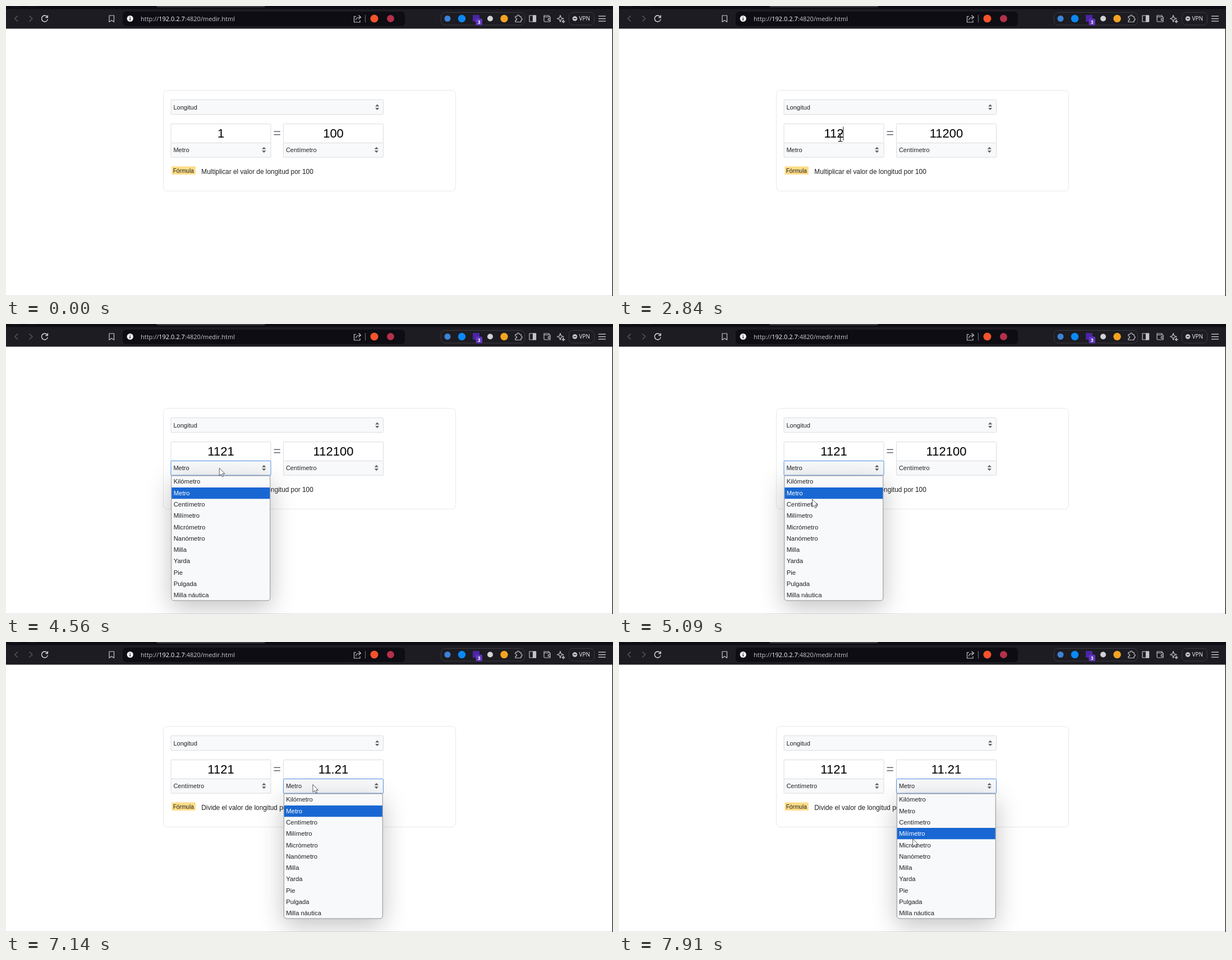
Write an HTML page that moves like this. It is 1082 px wide and 518 px high and loops after 8 s.

```html
<!DOCTYPE html>
<html lang="es">
<head>
<meta charset="utf-8">
<title>Conversor</title>
<style>
html, body { margin: 0; width: 100%; height: 100%; overflow: hidden; background: #fff; }
svg { display: block; width: 1082px; height: 518px; font: 11.05px "Liberation Sans", Arial, sans-serif; fill: #202124; }
.bar { font-family: "Open Sans", "Noto Sans", sans-serif; font-size: 11px; }
.icon { fill: none; stroke: #c4c4ca; stroke-width: 1.2; stroke-linejoin: round; }
.pill { fill: none; stroke: #3a3a42; }
.value { font-size: 22px; text-anchor: middle; fill: #000; }
.field { stroke: #dadce0; }
.focus { stroke: #4d90e8; }
.mark { fill: #5f6368; }
.list { font-size: 11.3px; }
.popup { fill: #f8f9fa; stroke: #8f9194; filter: drop-shadow(0 12px 22px rgba(0, 0, 0, .24)); }
</style>
</head>
<body>
<svg viewBox="0 0 1082 518">
  <rect width="1082" height="518" fill="#fff"/>
  <path d="M0 517.5H1081" stroke="#dfe1e5"/>
  <rect x="1080.7" y="40" width="1.3" height="478" fill="#17181c"/>

  <g class="bar">
    <rect width="1082" height="40.5" fill="#1d1c22"/>
    <rect width="1082" height="5.5" fill="#0d0e14"/>
    <path d="M268 0H462Q462 2.2 458 2.2H272Q268 2.2 268 0" fill="#3c3d45"/>
    <path d="M8 0H24V1H8ZM38 0H56V1H38Z" fill="#1d1c22"/>
    <rect x="208" y="10" width="503" height="26" rx="6" fill="#0d0d13"/>
    <g class="icon">
      <path d="M21 17.5L15.5 22.5L21 27.5M41.5 17.5L47 22.5L41.5 27.5" stroke="#5d5d65"/>
      <path d="M73.4 19.2A5.5 5.5 0 1 0 74.4 23.5M74.4 16.5V20.5H70.4" stroke="#e4e4e8" stroke-width="1.3"/>
      <path d="M184 17H192.5V28.5L188.25 25.5L184 28.5Z"/>
      <path d="M624 18.5H620.5V29H631V25.5M623.5 25.5Q624 20 631.5 20M628.5 16.5L632.5 20L628.5 23.5"/>
      <path d="M640.5 16V29.5" stroke="#66666e"/>
      <path d="M908 18.5H911Q911 16 913 16T915 18.5H918V21.5Q920 21.5 920 23.5T918 25.5V28.5H908V25.5Q910.5 25.5 910.5 23.5T908 21.5Z"/>
      <rect x="933" y="17" width="11.5" height="11"/>
      <path d="M939.5 17H944.5V28H939.5Z" fill="#c4c4ca"/>
      <path d="M959 18V26.5Q959 28 960.5 28H970V19.5H960Q958.5 19 959 17H968V19.5M970 22.5H966.5V25.5H970"/>
      <path d="M988 16.5L989.5 21L994 22.5L989.5 24L988 28.5L986.5 24L982.5 22.5L986.5 21ZM993.5 25L994.2 27L996 27.7L994.2 28.4L993.5 30L992.8 28.4L991 27.7L992.8 27Z"/>
      <path d="M1056 18.2H1069M1056 22.7H1069M1056 27.2H1069" stroke="#d6d6db"/>
    </g>
    <circle cx="221.2" cy="22.5" r="5.6" fill="#f4f4f6"/>
    <path d="M221.2 19.2V20.6M221.2 21.8V25.7" stroke="#111" stroke-width="1.4"/>
    <text x="240" y="26.7" fill="#c9c9ce">http://<tspan fill="#fff">192.0.2.7</tspan>:4820/medir.html</text>
    <circle cx="656.5" cy="22.5" r="7" fill="#f4532b"/>
    <circle cx="685.5" cy="22.5" r="6.5" fill="#b5304a"/>
    <rect class="pill" x="775.5" y="11.5" width="149" height="22.5" rx="7"/>
    <circle cx="787" cy="22.5" r="5.5" fill="#3d82d6"/>
    <circle cx="812.5" cy="22.5" r="6.7" fill="#0a89f5"/>
    <rect x="832" y="16" width="12" height="12" fill="#4a25a5"/>
    <rect x="837.5" y="22.5" width="11.5" height="12" rx="2.5" fill="#6135bd"/>
    <text x="843.3" y="31.5" font-size="8" font-weight="700" text-anchor="middle" fill="#fff">3</text>
    <circle cx="863" cy="22.5" r="5" fill="#d2d2d6"/>
    <circle cx="888" cy="22.5" r="6.7" fill="#f3a321"/>
    <rect class="pill" x="1003.5" y="11.5" width="45" height="22.5" rx="7"/>
    <circle cx="1014" cy="22.5" r="4.3" fill="#c8c8ce"/>
    <path d="M1011.7 22.5H1016.3" stroke="#1d1c22" stroke-width="1.4"/>
    <text x="1021.5" y="26.2" font-size="10" fill="#f1f1f3">VPN</text>
  </g>

  <rect x="280.5" y="150.5" width="521" height="180" rx="7" fill="#fff" stroke="#e6e8eb"/>
  <g id="form"></g>
  <path d="M477.5 224.2H488.8M477.5 229.8H488.8" stroke="#5f6368" stroke-width="1.5"/>
  <rect x="295.5" y="286.5" width="42.3" height="14.5" rx="1" fill="#fddc86"/>
  <text x="297.7" y="298.4" font-size="10.15">Fórmula</text>
  <text id="formula" x="348.3" y="300.2" font-size="11.85"></text>
  <g id="popups"></g>
  <circle id="click" r="10" fill="#ff0" fill-opacity=".47"/>
  <g id="pointer">
    <path id="arrow" d="M0 0V13.8L3.2 10.9L5.3 15.6L7.4 14.7L5.4 10.1H9.6Z" fill="#fff" stroke="#45474d" stroke-width=".9"/>
    <path id="beam" d="M-3.8-6.8H-1.2Q0-6.8 0-5.6V5.6Q0 6.8-1.2 6.8H-3.8M3.8-6.8H1.2Q0-6.8 0-5.6M0 5.6Q0 6.8 1.2 6.8H3.8" fill="none" stroke="#111" stroke-width="1.2"/>
  </g>
</svg>
<script>
const LOOP = 8000, LEFT = 294, RIGHT = 494.5, ROW = 20.27, LIST_TOP = 271.3, HOVER_LAG = 60;
const UNITS = ['Kilómetro', 'Metro', 'Centímetro', 'Milímetro', 'Micrómetro', 'Nanómetro',
  'Milla', 'Yarda', 'Pie', 'Pulgada', 'Milla náutica'];

// start, end, steps, then from, control and to points
const MOVES = [
  [160, 780, 10, 537, 347, 225, 320, 394.5, 235],
  [3700, 4030, 6, 394.5, 235, 390, 242, 384.7, 249.5],
  [4500, 5090, 9, 384.7, 249.5, 365, 285, 344.5, 313],
  [5160, 5300, 3, 344.5, 313, 343, 315, 341.5, 315.8],
  [6230, 6730, 8, 341.5, 315.8, 440, 235, 547, 254.5],
  [7390, 7910, 9, 547, 254.5, 535, 303, 523.7, 351.5]
];
const CLICKS = [[1010, 1080], [1150, 1230], [4300, 4430], [5710, 5910], [6930, 7140]];
const CARET = [[1010, 1150], [1550, 2490], [2710, 3700], [4230, 4300]];
const TYPED = [[1970, '11'], [2710, '112'], [3150, '1121']];
const RESULTS = [[2160, '1100'], [2840, '11200'], [3280, '112100'], [5910, '11.21']];

const $ = id => document.getElementById(id);
const within = (t, a, b) => t >= a && t < b;
const during = (spans, t) => spans.some(([a, b]) => within(t, a, b));
const show = (el, on) => el.setAttribute('visibility', on ? 'visible' : 'hidden');
const latest = (list, t, first) => list.reduce((v, [at, next]) => t >= at ? next : v, first);

const box = (x, y, w, h, fill, id = '') =>
  `<rect id="${id}" class="field" x="${x}" y="${y}" width="${w}" height="${h}" rx="1" fill="${fill}"/>`;
const updown = (x, y) =>
  `<path class="mark" d="M${x - 3.6} ${y - 1.2}h7.2l-3.6-4zm0 2.4h7.2l-3.6 4z"/>`;

function unitField(side, x) {
  return box(x, 210.5, 178, 34, '#fff') + box(x, 244.5, 178, 25.7, '#f8f9fa', side + 'Box') +
    (side === 'left' ? '<rect id="selection" x="376.5" y="215" width="12.3" height="25" fill="#3367d1"/>' : '') +
    `<text id="${side}Value" class="value" x="${x + 89}" y="235"></text>` +
    `<text id="${side}Unit" x="${x + 4.4}" y="260.8"></text>` + updown(x + 165.8, 257);
}

function popup(side, x) {
  const rows = UNITS.map((name, i) =>
    `<text x="${x + 4.7}" y="${LIST_TOP + ROW * (i + .5) + 4}">${name}</text>`).join('');
  return `<g id="${side}List" class="list"><path class="popup" d="M${x + .8} 271h176V489q0 5-5 5h-166q-5 0-5-5z"/>` +
    `<rect x="${x + 1.3}" width="175" height="${ROW}" fill="#1967d2"/>${rows}</g>`;
}

$('form').innerHTML = box(LEFT, 167.5, 378.5, 26, '#f8f9fa') +
  '<text x="298.4" y="184.8">Longitud</text>' + updown(661.7, 180.7) +
  unitField('left', LEFT) + unitField('right', RIGHT) +
  '<rect id="caret" y="215.5" width="1" height="24.5" fill="#222"/>';
$('popups').innerHTML = popup('left', LEFT) + popup('right', RIGHT);

function pointerAt(t) {
  const move = MOVES.filter(m => t >= m[0]).pop();
  if (!move) return null;
  const [a, b, n, x0, y0, cx, cy, x1, y1] = move;
  const k = Math.min(1, (Math.floor((t - a) / (b - a) * (n - 1) + 1e-6) + 1) / n);
  const bend = (p, c, q) => (1 - k) ** 2 * p + 2 * k * (1 - k) * c + k * k * q;
  return { x: bend(x0, cx, x1), y: bend(y0, cy, y1) };
}

function setList(side, open, t) {
  const list = $(side + 'List');
  show(list, open);
  if (!open) return;
  const y = pointerAt(t - HOVER_LAG).y;
  const row = y < LIST_TOP ? 1 : Math.floor((y - LIST_TOP) / ROW);
  list.querySelector('rect').setAttribute('y', Math.round(LIST_TOP + row * ROW));
  list.querySelectorAll('text').forEach((el, i) => el.setAttribute('fill', i === row ? '#fff' : '#202124'));
}

function draw(t) {
  const swapped = t >= 5910, selected = within(t, 1150, 1550);
  const leftOpen = within(t, 4430, 5910), rightOpen = t >= 7000;
  $('leftValue').textContent = latest(TYPED, t, '1');
  $('leftValue').style.fill = selected ? '#fff' : '#000';
  $('rightValue').textContent = latest(RESULTS, t, '100');
  $('leftUnit').textContent = swapped ? 'Centímetro' : 'Metro';
  $('rightUnit').textContent = swapped ? 'Metro' : 'Centímetro';
  $('formula').textContent = (swapped ? 'Divide' : 'Multiplicar') + ' el valor de longitud por 100';
  $('leftBox').classList.toggle('focus', within(t, 4300, 6930));
  $('rightBox').classList.toggle('focus', t >= 6930);

  show($('selection'), selected);
  show($('caret'), during(CARET, t));
  $('caret').setAttribute('x', Math.floor(LEFT + 89 + $('leftValue').getComputedTextLength() / 2) - .7);

  setList('left', leftOpen, t);
  setList('right', rightOpen, t);

  const p = pointerAt(t);
  show($('click'), p && during(CLICKS, t));
  const overInput = p && within(p.y, 211, 244) && (within(p.x, 294, 472) || within(p.x, 494, 673));
  const overText = p && within(p.x, 348, 548) && within(p.y, 289, 304);
  const beam = overInput || overText && !leftOpen && !rightOpen;
  show($('beam'), p && beam);
  show($('arrow'), p && !beam);
  if (!p) return;
  $('pointer').setAttribute('transform', `translate(${p.x} ${p.y})`);
  $('click').setAttribute('cx', p.x);
  $('click').setAttribute('cy', p.y);
}

const begin = performance.now();
function tick() {
  draw((performance.now() - begin) % LOOP);
  requestAnimationFrame(tick);
}
tick();
</script>
</body>
</html>
```
